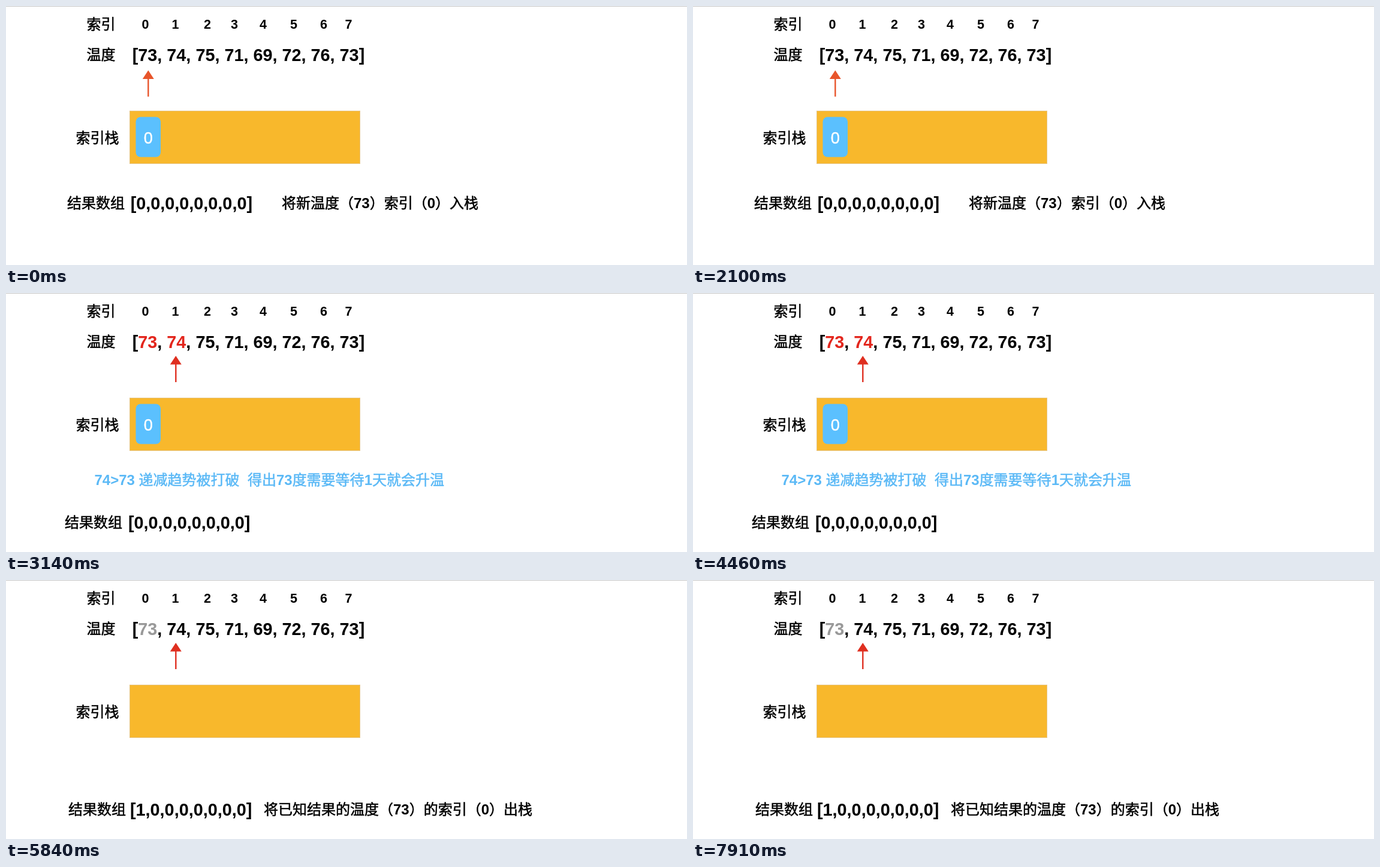
An HTML page that plays this animation: 1136x433 px, repeating every 8000 ms.

```html
<!DOCTYPE html>
<html lang="zh-CN">
<head>
<meta charset="utf-8">
<title>单调栈：每日温度</title>
<style>
  html, body { margin: 0; width: 100%; height: 100%; overflow: hidden; background: #fff; }
  svg { display: block; }
  text { font: 24px "Liberation Sans", "Noto Sans CJK SC", "Noto Sans CJK", sans-serif; white-space: pre; }
  .label { fill: #000; stroke: #000; stroke-width: .55; }
  .note { fill: #5bb9f6; stroke: #5bb9f6; }
  .label tspan { font-weight: bold; stroke: none; }
  .list { font-size: 28.8px; font-weight: bold; }
  .index { font-size: 21.5px; font-weight: bold; text-anchor: middle; }
  .item { font-size: 27px; text-anchor: middle; fill: #fff; stroke: #fff; stroke-width: .4; }
</style>
</head>
<body>
<svg id="stage" width="1136" height="433" viewBox="0 0 1136 433"></svg>
<script>
const stage = document.getElementById('stage');
const temps = [73, 74, 75, 71, 69, 72, 76, 73];
const indexX = [232.5, 282.5, 336, 381, 429, 480, 530, 571.5];
const RED = '#e3261d', GREY = '#999';

const text = (x, y, kind, content) => `<text x="${x}" y="${y}" class="${kind}">${content}</text>`;
const label = (x, y, content, kind = '') =>
  text(x, y, 'label ' + kind, content.replace(/\d+(>\d+)?/g, '<tspan>$&</tspan>'));
const list = (x, y, values) => text(x, y, 'list', `[${values}]`);

const temperatures = colors => list(210.7, 91.5,
  temps.map((t, i) => `<tspan fill="${colors[i] || '#000'}">${t}</tspan>`).join(', '));

const arrow = (x, y, color) =>
  `<path transform="translate(${x} ${y})" fill="${color}" d="M0 0L9.5 14.5H1.2V44H-1.2V14.5H-9.5Z"/>`;

const results = (labelX, listX, y, first) =>
  label(labelX, y, '结果数组') + list(listX, y + 1.5, [first, 0, 0, 0, 0, 0, 0, 0]);

const stackItem = '<rect x="216.5" y="185.5" width="41.5" height="67" rx="8" fill="#5bc0fe"/>' +
  text(237.2, 229.5, 'item', 0);

const base = '<rect width="1136" height="1" fill="#c6c6c6"/>' +
  '<rect x="206.5" y="175.5" width="384" height="88" fill="#f8b82c" stroke="#e6c586"/>' +
  label(134.5, 38.5, '索引') + label(134.5, 90, '温度') + label(116.5, 228.5, '索引栈') +
  indexX.map((x, i) => text(x, 37.7, 'index', i)).join('');

// Each step starts at a time in ms and holds until the next one.
const steps = [
  [0, temperatures([]) + arrow(237.3, 107.5, '#e8552b') + stackItem +
    results(102, 207.7, 338, 0) + label(460, 338, '将新温度（73）索引（0）入栈')],
  [2170, temperatures([RED, RED]) + arrow(283.3, 105, '#df2f20') + stackItem +
    label(147.5, 321, '74>73 递减趋势被打破  得出73度需要等待1天就会升温', 'note') +
    results(98, 204, 392.3, 0)],
  [5560, temperatures([GREY]) + arrow(283.3, 105, '#df2f20') +
    results(104, 207, 392.3, 1) + label(430, 392.3, '将已知结果的温度（73）的索引（0）出栈')]
];

stage.innerHTML = base + steps.map(([, art]) => `<g>${art}</g>`).join('');
const groups = stage.querySelectorAll('g');

function draw() {
  const t = performance.now() % 8000;
  const current = steps.filter(([start]) => t >= start).length - 1;
  groups.forEach((g, i) => g.style.display = i === current ? '' : 'none');
  requestAnimationFrame(draw);
}
draw();
</script>
</body>
</html>
```
